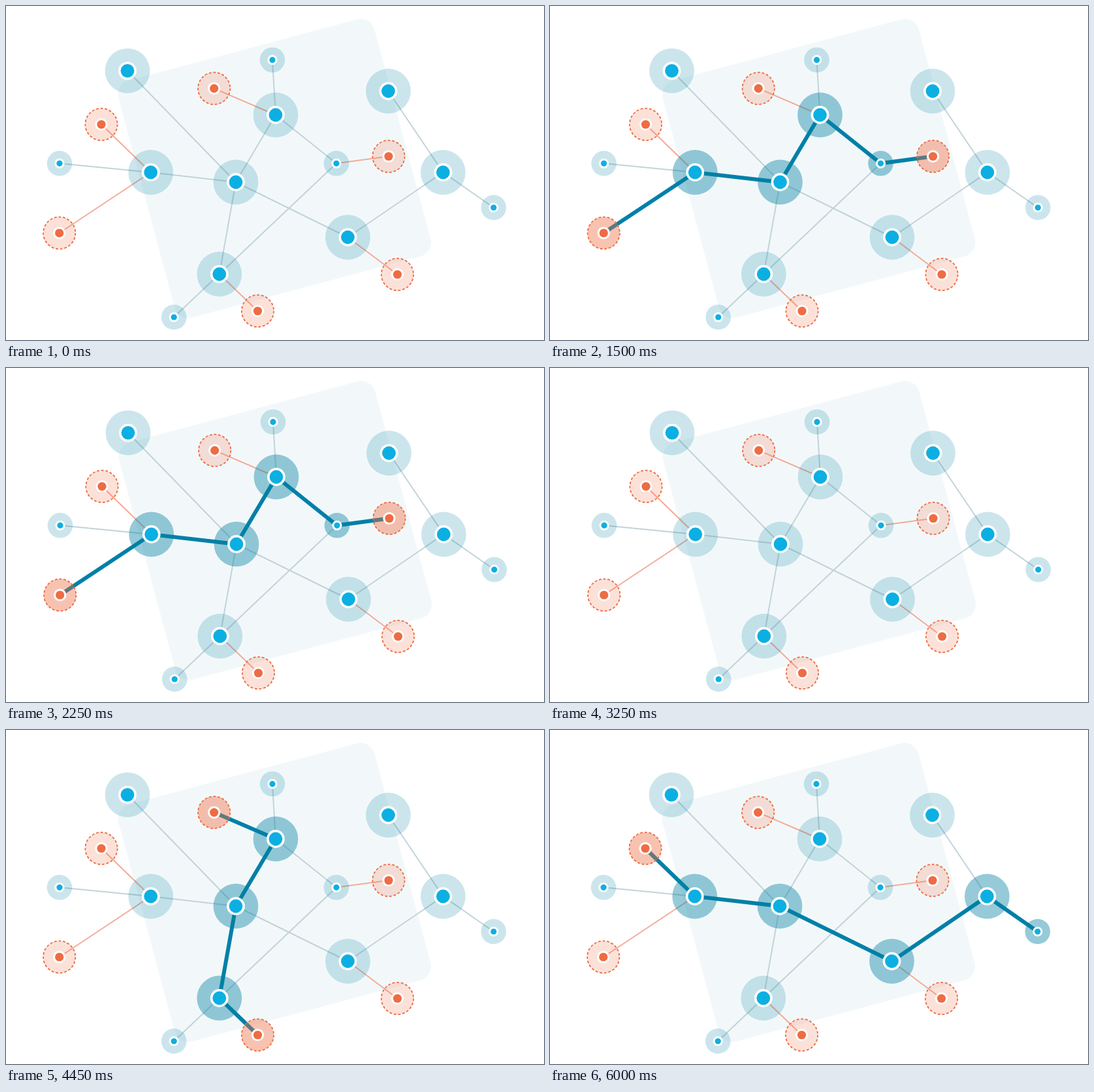
An HTML page with a canvas that plays this animation: 824x512 px, repeating every 7750 ms.

```html
<!DOCTYPE html>
<html lang="en">
<head>
<meta charset="utf-8">
<title>Network routes</title>
<style>
  html, body { margin: 0; width: 100%; height: 100%; overflow: hidden; background: #fff; }
  canvas { display: block; }
</style>
</head>
<body>
<canvas id="stage" width="824" height="512"></canvas>
<script>
const ctx = document.getElementById('stage').getContext('2d');
const LOOP = 7750;

// Radii of halo, white ring and core per kind of node
const KINDS = {
  hub:  { halo: 34.4, ring: 13.9, core: 10.4, rgb: '0,126,160', color: '#0cafe2' },
  leaf: { halo: 19.3, ring: 7.6, core: 4.6, rgb: '0,126,160', color: '#0cafe2' },
  user: { halo: 24.6, ring: 9.6, core: 6.6, rgb: '239,108,67', color: '#ee6c43' }
};

const NODES = {
  a: ['hub', 186, 99.3], b: ['hub', 413, 167], c: ['hub', 585.5, 130.5], d: ['hub', 221.7, 255],
  e: ['hub', 352, 270], f: ['hub', 669.4, 255], g: ['hub', 523.5, 354.5], h: ['hub', 326.8, 411],
  i: ['leaf', 408, 82.7], j: ['leaf', 82, 241.3], k: ['leaf', 506, 241.3],
  l: ['leaf', 746.8, 309], m: ['leaf', 257.2, 477],
  p: ['user', 318.7, 126.3], q: ['user', 146, 181.5], r: ['user', 586, 230.5],
  s: ['user', 81.7, 348], t: ['user', 599.5, 411.5], u: ['user', 385.5, 467.5]
};

const GREY_LINKS = 'ae jd de eb bi bk kh eh eg gf cf fl hm'.split(' ');
const USER_LINKS = 'pb qd sd kr gt hu'.split(' ');

// Each route grows one hop per 100 ms, may blink, then holds
const ROUTES = [
  { path: 'sdebkr', start: 1000, blink: 2000, end: 3250 },
  { path: 'pbehu', start: 3300, blink: 4200, end: 5450 },
  { path: 'qdegfl', start: 5500, blink: Infinity, end: LOOP }
];

function litPath(t) {
  const route = ROUTES.find(r => t >= r.start && t < r.end);
  if (!route) return '';
  const beat = Math.floor((t - route.blink) / 50);
  if (beat >= 0 && beat < 5 && beat % 2 === 0) return '';
  return route.path.slice(0, Math.floor((t - route.start) / 100) + 1);
}

function drift(t) {
  if (t < 1000 || t >= 3300) return 0;
  return t < 2000 ? 0.5 : 1;
}

function line(names, color, width) {
  ctx.beginPath();
  for (const n of names) ctx.lineTo(NODES[n][1], NODES[n][2]);
  ctx.strokeStyle = color;
  ctx.lineWidth = width;
  ctx.stroke();
}

function disc(x, y, radius, color) {
  ctx.beginPath();
  ctx.arc(x, y, radius, 0, Math.PI * 2);
  ctx.fillStyle = color;
  ctx.fill();
}

function drawPanel() {
  ctx.save();
  ctx.translate(411.3, 249);
  ctx.rotate(-Math.PI / 12);
  ctx.beginPath();
  ctx.roundRect(-203, -188, 406, 376, 22);
  ctx.fillStyle = '#f2f8fa';
  ctx.fill();
  ctx.restore();
}

function drawNode(name, lit) {
  const [type, x, y] = NODES[name];
  const kind = KINDS[type];
  disc(x, y, kind.halo, `rgba(${kind.rgb},${lit ? 0.41 : 0.2})`);
  if (type === 'user') {
    ctx.setLineDash([3.9, 2.8]);
    ctx.strokeStyle = kind.color;
    ctx.lineWidth = 1.8;
    ctx.stroke();
    ctx.setLineDash([]);
  }
  disc(x, y, kind.ring, '#fff');
  disc(x, y, kind.core, kind.color);
}

function draw(t) {
  const lit = litPath(t);
  ctx.setTransform(1, 0, 0, 1, 0, 0);
  ctx.fillStyle = '#fff';
  ctx.fillRect(0, 0, 824, 512);
  ctx.translate(drift(t), 0);
  drawPanel();
  GREY_LINKS.forEach(link => line(link, '#c3d3d8', 2));
  USER_LINKS.forEach(link => line(link, '#f3ab97', 2));
  line(lit, '#0080a8', 6);
  for (const name in NODES) drawNode(name, lit.includes(name));
}

const began = performance.now();
function tick() {
  draw((performance.now() - began) % LOOP);
  requestAnimationFrame(tick);
}
tick();
</script>
</body>
</html>
```
